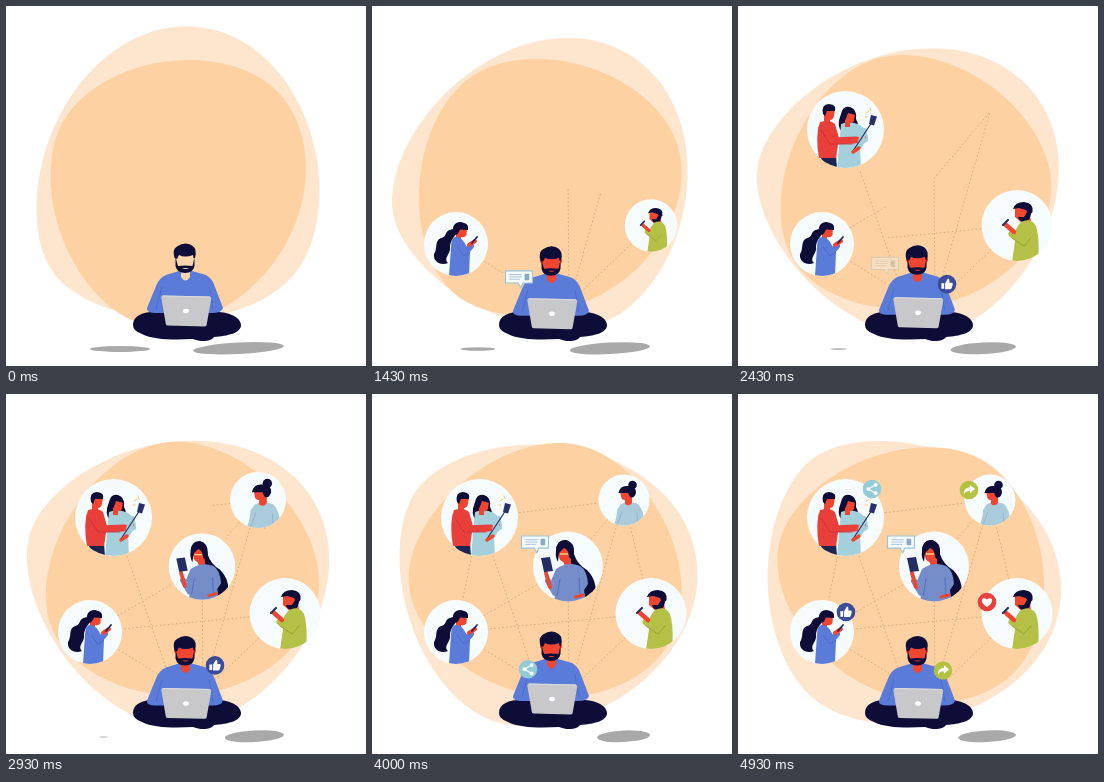
Animation, 360 px wide and 360 px high, one loop 5 s. Source, as an HTML page:

```html
<!DOCTYPE html>
<html lang="en">
<head>
<meta charset="utf-8">
<title>Social network</title>
<style>
  html, body { margin: 0; width: 100%; height: 100%; overflow: hidden; background: #fff; }
  svg { display: block; width: 100vw; height: 100vh; }
  .navy { fill: #0e0d38; }
  .blue { fill: #5b7bd9; }
  .skin { fill: var(--skin); }
  .arm { fill: none; stroke-linecap: round; stroke-linejoin: round; }
  .hand { fill: none; stroke: var(--skin); stroke-linecap: round; }
  .disc { fill: #f6fcfd; }
  .fold { fill: none; stroke: #4766c4; stroke-width: .8; }
  .mark { fill: none; stroke: #fff; stroke-linecap: round; stroke-linejoin: round; }
  #links { stroke: #d3a270; stroke-width: .85; stroke-dasharray: 1.6 2.4; }
</style>
</head>
<body>
<svg id="stage" viewBox="0 0 360 360">
  <defs>
    <clipPath id="clipA"><circle cx="84" cy="238" r="32"/></clipPath>
    <clipPath id="clipB"><circle cx="107.5" cy="123.5" r="38.5"/></clipPath>
    <clipPath id="clipC"><circle cx="279" cy="219.5" r="35.5"/></clipPath>
    <clipPath id="clipD"><circle cx="252" cy="106" r="25.5"/></clipPath>
    <clipPath id="clipE"><circle cx="196" cy="172.5" r="35"/></clipPath>

    <g id="like">
      <circle r="10" fill="#3d4b9b"/>
      <path d="M-6-1h3v6h-3zM-2-1L1-6Q3-6 2.5-1.5H5.5Q6.500-1 6 1L5 4.500Q4.500 5.500 3 5.500H-2z" fill="#fff"/>
    </g>
    <g id="share">
      <circle r="10" fill="#93cbd8"/>
      <path class="mark" d="M4-4.500L-4 0L4 4.500" stroke-width="1.300"/>
      <g fill="#fff"><circle cx="4" cy="-4.500" r="2"/><circle cx="-4" r="2"/><circle cx="4" cy="4.500" r="2"/></g>
    </g>
    <g id="reply">
      <circle r="10" fill="#b4c244"/>
      <path d="M1-5.500L6.500-1L1 3.500V1Q-4 .5-5.500 5Q-6-2.500 1-3z" fill="#fff"/>
    </g>
    <g id="heart">
      <circle r="10" fill="#e8413b"/>
      <path d="M0 5.500C-9-.5-5.500-7 0-2.800C5.500-7 9-.5 0 5.500z" fill="#fff"/>
    </g>
    <g id="note">
      <path d="M-14.500-7H14.500V6H4L2 11L-1 6H-14.500z" fill="#f4fbfd" stroke="#9cc3d4" stroke-width="1.200"/>
      <path d="M-10.500-3H3M-10.500-.5H3M-10.500 2H1" stroke="#a9bfd4"/>
      <rect x="6" y="-4" width="5" height="7" rx="1" fill="#8aa9c2"/>
    </g>
  </defs>

  <ellipse id="shadeL" cy="343" fill="#a9a9a9"/>
  <ellipse id="shadeR" cy="342.300" ry="5.800" fill="#a9a9a9"/>
  <path id="outer" fill="#fee5ce"/>
  <path id="inner" fill="#fdd1a2"/>
  <g id="links"></g>

  <g id="girl">
    <circle class="disc" cx="84" cy="238" r="32"/>
    <g clip-path="url(#clipA)">
      <path class="navy" d="M82 223C71 224 76 231 69 232C62 235 66 243 62 248C61 256 69 260 76 257C71 252 79 248 78 241C78 234 83 231 85 226z"/>
      <path class="skin" d="M84 221H95L94.500 229Q93 232 89 231V235H84z"/>
      <path class="navy" d="M81 225C80 218 86 214 92 217Q97 218 96 224L88 223.500Q87 227 84 229z"/>
      <path class="blue" d="M83 231Q89 231 92 236L98 246L97 270H77L79 241Q79 233 83 231z"/>
      <path class="arm" d="M86 239L93 247L99 240" stroke="#5b7bd9" stroke-width="6"/>
      <path class="fold" d="M85 241L92 250L98 246"/>
      <path class="hand" d="M97 239L103 235" stroke-width="4"/>
      <path class="arm" d="M100 237L105 231" stroke="#24285a" stroke-width="1.800"/>
    </g>
  </g>

  <g id="couple">
    <circle class="disc" cx="107.5" cy="123.500" r="38.500"/>
    <g clip-path="url(#clipB)">
      <path d="M82 148H98L99 163H86z" fill="#1d2450"/>
      <path class="navy" d="M103 108Q105 99 112 101Q119 103 118 113Q122 120 119 126H104Q98 120 103 108z"/>
      <path d="M103 118Q112 114 122 119Q131 125 130 135L122 140L123 164H99L101 140z" fill="#a4d0db"/>
      <path class="skin" d="M86 103H97L96 110Q95 114 92 114V118H86z"/>
      <path class="navy" d="M85 108Q83 98 91 98Q99 99 97 105L89 105L87 110z"/>
      <path d="M82 116Q92 113 97 118L101 132L98 152H81Q77 130 82 116z" fill="#e83f3b"/>
      <path class="arm" d="M84 122L93 135L118 134" stroke="#e83f3b" stroke-width="7"/>
      <path class="arm" d="M83 124L92 138L114 138" stroke="#c62f38" stroke-width=".8"/>
      <path class="hand" d="M119 134L126 131" stroke-width="4"/>
      <path class="skin" d="M107 106Q112 104 117 108L116 115Q114 118 112 117V121H107z"/>
      <path class="navy" d="M104 112Q104 103 111 102Q117 103 118 109L110 107Q108 114 105 117z"/>
      <path class="arm" d="M126 125L122 139L114 142" stroke="#a4d0db" stroke-width="6"/>
      <path class="arm" d="M115 145L134 116" stroke="#28305f" stroke-width="1.200"/>
      <path class="hand" d="M115 146L121 142" stroke-width="3.500"/>
      <path d="M133 109L139 110.500L136 119.500L131 118z" fill="#28306b"/>
      <path class="arm" d="M128 107L131 105M129 111L127 111M132 102L133 105" stroke="#f2c56b"/>
    </g>
  </g>

  <g id="guy">
    <circle class="disc" cx="279" cy="219.500" r="35.500"/>
    <g clip-path="url(#clipC)">
      <path class="skin" d="M277 202H290L293 215L285 218L277 211z"/>
      <path class="navy" d="M275 203Q277 196 286 196Q296 197 294.500 206L291 210L288 204L281 202z"/>
      <path class="navy" d="M280 211L286 211L289 206L293 208Q292 216 285 216Q281 215 280 211z"/>
      <path d="M283 216Q293 211 298 220Q302 233 300 256H274L277 235Q275 224 283 216z" fill="#b5c046"/>
      <path class="arm" d="M291 224L285 236L274 228" stroke="#b5c046" stroke-width="7"/>
      <path class="arm" d="M293 232L286 240L274 232" stroke="#8f9c2e" stroke-width=".8"/>
      <path class="hand" d="M276 226L268 219" stroke-width="4.500"/>
      <path class="arm" d="M265 219L270 214" stroke="#2b2f5c" stroke-width="2.200"/>
    </g>
  </g>

  <g id="reader">
    <circle class="disc" cx="196" cy="172.500" r="35"/>
    <g clip-path="url(#clipE)">
      <path class="navy" d="M184 156Q185 145 194 146Q203 148 202 160Q205 170 215 176Q226 187 223 203L214 208L200 180L190 166z"/>
      <path class="skin" d="M187 153L199 153L199 168L200 174L193 175L192 168Q187 167 187 162z"/>
      <path class="navy" d="M184 157Q184 147 194 146Q203 149 202 168L197 163Q197 156 192 154L187 159L186 168Q183 163 184 157z"/>
      <path d="M188 160H196" stroke="#f6cf78" stroke-width="1.300"/>
      <path d="M184 175Q196 167 208 172Q215 176 216 190L212 196L214 209H182L184 193L179 187z" fill="#748dc8"/>
      <path class="arm" d="M187 178L183 199L176 187" stroke="#748dc8" stroke-width="6"/>
      <path class="fold" d="M188 185L185 202M207 184L208 204"/>
      <path class="hand" d="M178 193L174 179" stroke-width="4"/>
      <path class="hand" d="M203 203L211 201" stroke-width="3"/>
      <path d="M169 164L178 163L181 177L172 178z" fill="#252c62"/>
    </g>
  </g>

  <g id="bun">
    <circle class="disc" cx="252" cy="106" r="25.500"/>
    <g clip-path="url(#clipD)">
      <path d="M249 110Q257 106 266 110Q273 117 272 133H241Q245 124 245 116z" fill="#a9cbda"/>
      <path class="skin" d="M248 97H260V109Q257 113 253 110V106Q249 106 249 102z"/>
      <circle class="navy" cx="260.500" cy="91" r="4.300"/>
      <path class="navy" d="M246.500 99Q248 91 256 92Q265 93 264 99Q262 105 258 103L256 99z"/>
      <path class="arm" d="M250 118L245 131M265 119L266 130" stroke="#8db3c7" stroke-width=".8"/>
    </g>
  </g>

  <path class="navy" d="M127 319C127 309 139 305 154 306H207C222 305 235 311 235 319C235 327 222 330 208 331C205 336 194 336 187 333C169 334 147 334 136 328Q127 325 127 319z"/>
  <g id="man">
    <path class="blue" d="M173 265Q180 262 186 265L200 269Q206 272 209 281L217 302Q216 307 206 307H150Q140 307 141 302L150 280Q153 272 160 269z"/>
    <path class="fold" d="M156 281L150 303M203 281L207 303"/>
    <path class="skin" d="M175 259H184V271Q179.500 278 175 271z"/>
    <rect class="skin" x="168" y="249" width="22" height="6" rx="3"/>
    <path class="skin" d="M170 246H188.500V257Q187 264 179 264Q171 264 170 257z"/>
    <path class="navy" d="M168.500 252Q166 243 171 240.500Q179 235 186 239.500Q191.500 243 189 252H187.500L187 249Q179 252 173 249L171 253z"/>
    <path class="navy" d="M169.500 251L172 260Q179 259 186.500 260L188.500 251V260Q187 267 179 267Q171 267 169.500 260z"/>
    <path class="skin" d="M176 262H183Q179.500 264 176 262z"/>
    <g transform="rotate(1.300 180 305)">
      <path d="M157 290H203Q205 290 205 292L201 318Q201 320 199 320H162Q160 320 160 318L155 292Q155 290 157 290z" fill="#c8c8ca"/>
      <path d="M156.500 290.500H203.500" stroke="#dcdcde"/>
      <ellipse cx="180" cy="305" rx="2.900" ry="2.300" fill="#fff"/>
    </g>
  </g>
  <g id="icons"></g>
</svg>

<script>
const LOOP = 5000, FPS = 14;
const SPIN = 0.018;    // blob turn, degrees per ms
const GROW = 0.14;     // link growth, px per ms
const DRIFT = 0.0135;  // rise of floating icons, px per ms
const $ = id => document.getElementById(id);
const clamp = v => Math.min(1, Math.max(0, v));

function set(el, attrs) {
  for (const k in attrs) el.setAttribute(k, attrs[k]);
}
function make(tag, parent, attrs) {
  const el = document.createElementNS('http://www.w3.org/2000/svg', tag);
  set(el, attrs);
  return parent.appendChild(el);
}

// Ease out with an overshoot.
function pop(t, start, span) {
  const k = clamp((t - start) / span) - 1;
  return 1 + 2.7 * k ** 3 + 1.7 * k ** 2;
}

// Convex outline from its support function: radius plus harmonics [cos, sin].
function blob(r, harmonics) {
  const points = [];
  for (let i = 0; i < 120; i++) {
    const a = i * Math.PI / 60;
    let h = r, dh = 0;
    harmonics.forEach(([p, q], j) => {
      const n = j + 1, c = Math.cos(n * a), s = Math.sin(n * a);
      h += p * c + q * s;
      dh += n * (q * c - p * s);
    });
    points.push([h * Math.cos(a) - dh * Math.sin(a), h * Math.sin(a) + dh * Math.cos(a)]);
  }
  return `M${points.join('L')}Z`;
}
set($('outer'), { d: blob(145.8, [[9.2, -6], [-2.5, -3.6], [-0.7, 6.6], [-1.7, -0.4]]) });
set($('inner'), { d: blob(130.8, [[-4, -2.6], [-2.7, -4.3], [0.7, -5.2], [-0.4, 1.2]]) });

// Avatar centre and pop time
const avatars = {
  girl: [84, 238, 680],
  guy: [279, 219.5, 1300],
  couple: [107.5, 123.5, 1725],
  reader: [196, 172.5, 2730],
  bun: [252, 106, 2580]
};
const nodes = { ...avatars, left: [165, 288], right: [197, 297] };

const links = [
  ['right', 'guy', 600],
  ['right', 'bun', 600],
  ['right', 'reader', 600],
  ['left', 'girl', 900],
  ['left', 'couple', 1500],
  ['guy', 'girl', 1500],
  ['reader', 'bun', 1700],
  ['girl', 'reader', 1900],
  ['bun', 'couple', 2590],
  ['couple', 'girl', 2700],
  ['bun', 'guy', 2700]
].map(([from, to, start]) => {
  const [x1, y1] = nodes[from], [x2, y2] = nodes[to];
  const dx = x2 - x1, dy = y2 - y1;
  return { x1, y1, dx, dy, start, len: Math.hypot(dx, dy), el: make('line', $('links'), { x1, y1 }) };
});

// Icon, place, start; those with an end float up and fade.
const icons = [
  ['note', 147, 282, 640, 2600],
  ['like', 209, 288, 1700, 3650],
  ['note', 163, 148.5, 3350],
  ['share', 156, 284, 3350, 4800],
  ['reply', 205, 287, 4150, 6000],
  ['like', 108, 218, 4050],
  ['heart', 249, 208, 4070],
  ['share', 134, 95, 4570],
  ['reply', 231, 96, 4570]
].map(([id, x, y, start, end]) => ({ x, y, start, end, el: make('use', $('icons'), { href: '#' + id }) }));

function draw(t) {
  $('stage').style.setProperty('--skin', t < 1300 ? '#ffd5ae' : '#ef4632');
  set($('outer'), { transform: `translate(163.5 179.5) rotate(${SPIN * t})` });
  set($('inner'), { transform: `translate(175.5 184.5) rotate(${SPIN * t})` });

  const fade = clamp(1 - t / 3400);
  set($('shadeL'), { cx: 95 + 19 * fade, rx: 30 * fade, ry: 3 * fade });
  const edge = 206 - 19 * Math.cos(Math.PI * t / 4000), mid = (edge + 278) / 2;
  set($('shadeR'), { cx: mid, rx: 278 - mid, transform: `rotate(-3 ${mid} 342)` });

  for (const { x1, y1, dx, dy, start, len, el } of links) {
    const k = clamp((t - start) * GROW / len);
    set(el, { x2: x1 + dx * k, y2: y1 + dy * k });
  }
  for (const id in avatars) {
    const [x, y, start] = avatars[id];
    set($(id), { transform: `translate(${x} ${y}) scale(${pop(t, start, 600)}) translate(${-x} ${-y})` });
  }
  for (const { x, y, start, end, el } of icons) {
    const rise = end ? DRIFT * Math.max(0, t - start) : 0;
    set(el, {
      transform: `translate(${x} ${y - rise}) scale(${0.93 * pop(t, start, 350)})`,
      opacity: end ? clamp((end - t) / 500) : 1
    });
  }
  const bob = 2.25 * (1 - Math.cos(Math.PI * t / 1000));
  set($('man'), { transform: `translate(0 ${bob})` });
}

function tick() {
  const t = performance.now() % LOOP;
  draw(Math.floor((t + 2) * FPS / 1000) * 1000 / FPS % LOOP);
  requestAnimationFrame(tick);
}
tick();
</script>
</body>
</html>
```
